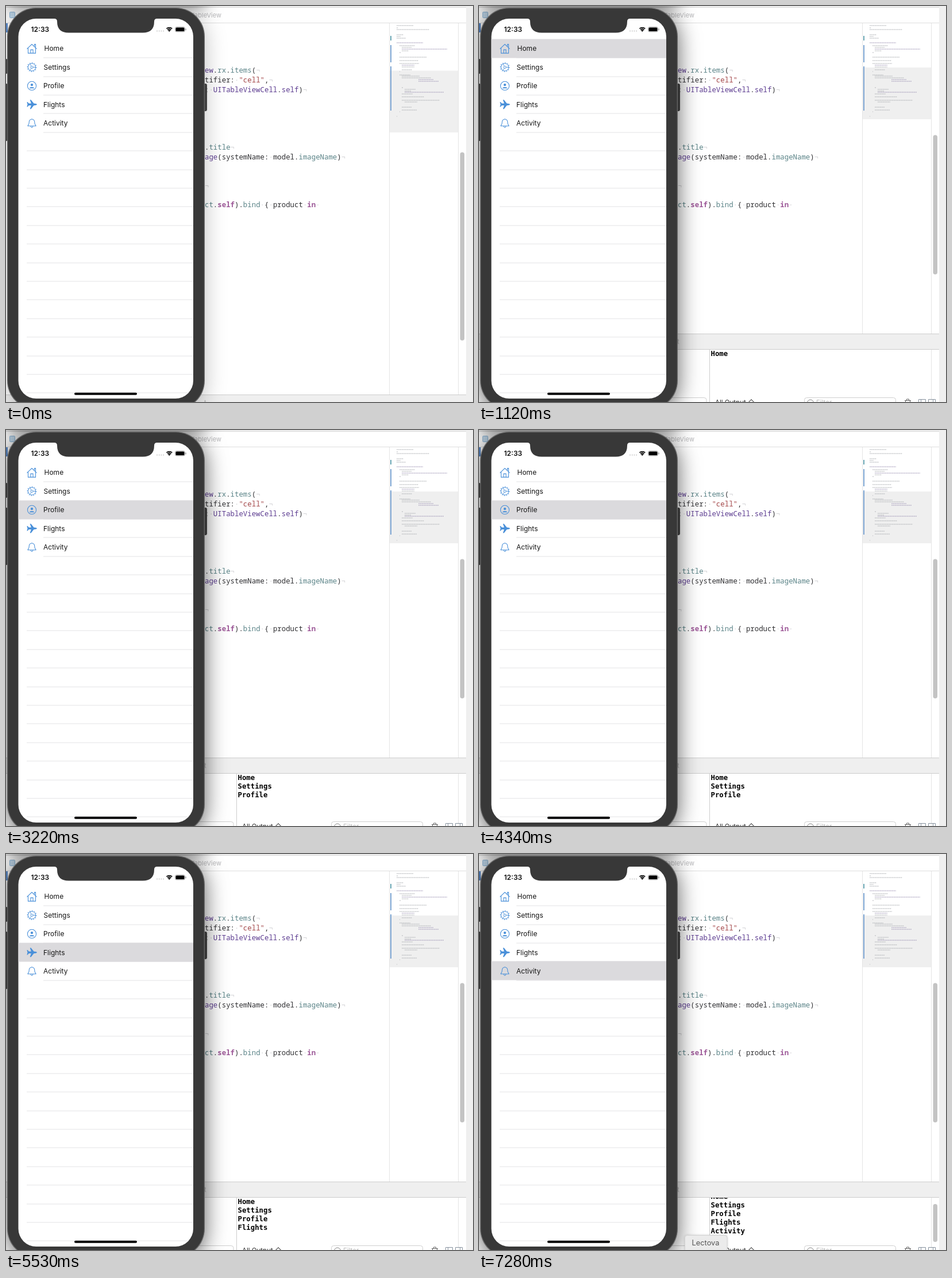
An HTML page with a canvas for the animation above (7350 ms loop, 813 by 689 pixels).

```html
<!DOCTYPE html>
<html lang="en">
<head>
<meta charset="utf-8">
<title>Table view demo</title>
<style>
html, body { margin: 0; width: 100%; height: 100%; overflow: hidden; background: #fff; }
canvas { display: block; }
</style>
</head>
<body>
<canvas id="stage" width="813" height="689"></canvas>
<script>
const c = document.getElementById('stage').getContext('2d');
const LOOP = 7350, ROW = 32.4, LIST_TOP = 57.8;
const SANS = 'Inter, sans-serif', MONO = '"Noto Sans Mono", monospace';
const BLUE = '#4a90d9', DARK = '#303033', TEAL = '#5a8387', PURPLE = '#5d3d91', PINK = '#9c5797', RED = '#a4484a', FAINT = '#d0d0d3';

// label, label x, time pressed, time printed
const items = [
  ['Home', 66.5, 770, 840],
  ['Settings', 65.5, 1890, 1960],
  ['Profile', 65, 3080, 3150],
  ['Flights', 65, 4410, 4480],
  ['Activity', 65, 5600, 5670],
];
const PANEL_OPEN = 840, PANEL_TIME = 210, TIP_AT = 7000;

// baseline followed by [text, colour] runs
const code = [
  [116, ['ew', PURPLE], ['.', DARK], ['rx', TEAL], ['.', DARK], ['items', TEAL], ['(', DARK], ['¬', FAINT]],
  [132.7, ['tifier:', DARK], ['·', FAINT], ['"cell"', RED], [',', DARK], ['¬', FAINT]],
  [149.5, [':', DARK], ['·', FAINT], ['UITableViewCell', PURPLE], ['.', DARK], ['self', PURPLE], [')', DARK], ['¬', FAINT]],
  [249.7, ['.', DARK], ['title', TEAL], ['¬', FAINT]],
  [266.5, ['age', PURPLE], ['(systemName:', DARK], ['·', FAINT], ['model.', DARK], ['imageName', TEAL], [')', DARK], ['¬', FAINT]],
  [316.5, ['¬', FAINT]],
  [350, ['ct', TEAL], ['.', DARK], ['self', PINK, 1], [').', DARK], ['bind', TEAL], ['·', FAINT], ['{', DARK], ['·', FAINT], ['product', DARK], ['·', FAINT], ['in', PINK, 1], ['·', FAINT]],
];

// minimap lines: y, indent, length
const miniLines = ('34 0 29,38 0 2,41 0 57,50 0 12,53 0 7,56 0 16,64 0 46,69 5 27,72 9 17,75 9 79,78 9 12,' +
  '81 5 2,89 5 47,95 5 33,100 5 34,103 9 22,106 9 22,111 9 18,114 5 1,120 5 19,122 9 31,125 9 51,' +
  '128 38 26,131 38 35,142 9 2,145 14 19,148 14 11,150 14 68,153 9 19,158 9 39,164 9 66,167 14 22,' +
  '176 9 17,181 9 26,184 5 1,192 0 1').split(',').map(s => s.split(' ').map(Number));
const miniPurple = new Set([64, 75, 103, 128, 131, 150]);

const ramp = (t, start, length) => Math.min(1, Math.max(0, (t - start) / length));

function rect(x, y, w, h, color) {
  c.fillStyle = color;
  c.fillRect(x, y, w, h);
}
function round(x, y, w, h, r, fill, stroke) {
  c.beginPath();
  c.roundRect(x, y, w, h, r);
  if (fill) { c.fillStyle = fill; c.fill(); }
  if (stroke) { c.strokeStyle = stroke; c.lineWidth = 1; c.stroke(); }
}
function shadow(alpha, blur, dy = 0) {
  c.shadowColor = `rgba(0,0,0,${alpha})`;
  c.shadowBlur = blur;
  c.shadowOffsetY = dy;
}
function text(s, x, y, font, color, align = 'left') {
  c.font = font;
  c.fillStyle = color;
  c.textAlign = align;
  c.fillText(s, x, y);
}
function line(d, color, width = 1.1) {
  c.strokeStyle = color;
  c.lineWidth = width;
  c.stroke(new Path2D(d));
}
function circle(x, y, r, color, width) {
  c.beginPath();
  c.arc(x, y, r, 0, 7);
  if (width) { c.strokeStyle = color; c.lineWidth = width; c.stroke(); }
  else { c.fillStyle = color; c.fill(); }
}

function drawEditor(open) {
  rect(0, 0, 813, 689, '#efefef');
  rect(0, 2, 801, 687, '#fff');
  rect(0, 2, 801, 1, '#dadada');
  rect(0, 29, 801, 1, '#dedede');
  round(6.5, 10.5, 9, 10, 1, '#c5ddf0', '#8fb8da');
  rect(0, 30, 3, 16, '#5b8ac9');
  text('TableView', 375, 20, '11px ' + SANS, '#b8b8ba', 'right');

  for (const [y, ...runs] of code) {
    let x = 346;
    for (const [s, color, bold] of runs) {
      text(s, x, y, (bold ? 700 : 500) + ' 12.38px ' + MONO, color);
      x += s.length * 7.43;
    }
  }

  const viewTop = 112.5 - 5.5 * open;
  rect(668, viewTop, 119, 107.5 - 17.5 * open, '#efefef');
  c.setLineDash([2.4, .6]);
  for (const [y, indent, length] of miniLines) {
    const x = 680 + indent;
    line(`M${x} ${y}h${length}`, miniPurple.has(y) ? '#a9a2be' : '#b6b8bb', 1.2);
  }
  c.setLineDash([]);
  rect(669, 52, 2, 8, '#6aa7b5');
  rect(669, 68, 2, 30, '#7ea6d3');
  rect(669, 105, 2, 77, '#7ea6d3');
  rect(667, 30, 1, 659, '#e4e4e4');
  rect(787, 30, 1, 659, '#e4e4e4');
  round(790.5, 254.5 - 30 * open, 7.5, 327.5 - 85 * open, 3.75, '#c3c3c3');
}

function drawConsole(t, open) {
  const top = 677 - 106 * open;
  rect(0, top, 801, 118, '#fff');
  rect(0, top, 801, 26, '#efefef');
  rect(0, top - 1, 801, 1, '#cdcdcd');
  rect(0, top + 26, 801, 1, '#cdcdcd');
  text('t', 345, top + 17, '11px ' + SANS, '#b5b5b5');
  rect(401, top + 27, 1, 91, '#cdcdcd');
  rect(787, top + 27, 1, 91, '#e4e4e4');

  const scrolled = t >= items[4][3];
  c.save();
  c.beginPath();
  c.rect(402, top + 27, 385, 84);
  c.clip();
  items.forEach(([name, , , printed], i) => {
    const y = top + 38.2 + i * 14.9 - (scrolled ? 9.3 : 0);
    if (t >= printed) text(name, 403.5, y, 'bold 12.34px "DejaVu Sans Mono", monospace', '#000');
  });
  c.restore();
  if (scrolled) round(790.5, top + 38, 7.5, 66, 3.75, '#c3c3c3');

  text('All Output ◇', 411, top + 123, '11.5px ' + SANS, '#333');
  round(250.5, top + 110.5, 145.5, 22, 4, '#fff', '#cfcfcf');
  round(566.5, top + 110.5, 159, 22, 4, '#fff', '#cfcfcf');
  circle(577, top + 119.5, 5.5, '#858585', 1);
  text('Filter', 587, top + 123, '11.5px ' + SANS, '#bdbdbd');
  c.save();
  c.translate(0, top);
  line('M741 115.5h11M744.5 115v-2h4v2M742.5 116v10h8v-10M745 118v6M748 118v6', '#666', 1);
  line('M765.5 113.5h12v10h-12zM769.5 114v9M782.5 113.5h12v10h-12zM790.5 114v9', '#87929e', 1);
  c.restore();
}

const icons = [
  () => {
    line('M-8.5 .5L0-7.5L8.5 .5M-6.5-1V8H6.5V-1M4.5-4V-7.5H6.5V-2M-2 8V2H2V8', BLUE);
  },
  () => {
    circle(0, 0, 6.6, BLUE, 1);
    c.setLineDash([1.4, 2.6]);
    circle(0, 0, 7.7, BLUE, 1.3);
    c.setLineDash([]);
    circle(0, 0, 2, BLUE, .9);
    line('M2 0H6.5M-1-1.8L-3.2-5.6M-1 1.8L-3.2 5.6', BLUE, .9);
  },
  () => {
    circle(0, 0, 7.6, BLUE, 1.1);
    circle(0, -1.8, 2.2, BLUE);
    c.fill(new Path2D('M-4.2 4.4C-3.8 1.2 3.8 1.2 4.2 4.4Z'));
  },
  () => {
    c.fillStyle = BLUE;
    c.fill(new Path2D('M9 0Q8-1.7 3.5-1.7L-1.5-8H-3.3L-1.2-1.7H-5.3L-7.4-4.3H-8.6L-7.5 0L-8.6 4.3H-7.4L-5.3 1.7H-1.2L-3.3 8H-1.5L3.5 1.7Q8 1.7 9 0Z'));
  },
  () => {
    line('M-7 5C-7 3-4.7 3.5-4.7-2C-4.7-5-2.5-6.5 0-7C2.5-6.5 4.7-5 4.7-2C4.7 3.5 7 3 7 5ZM-1.8 5.5C-1.5 8.5 1.5 8.5 1.8 5.5', BLUE);
  },
];

function drawPhone(t) {
  round(-20, 92, 23, 26, 3, '#484848');
  round(-20, 135, 23, 100, 3, '#484848');
  round(330, 135, 20, 48, 3, '#484848');

  // the window title bar lies above the stage and only its shadow shows
  c.save();
  shadow(.5, 30, 4);
  rect(2, -60, 344, 58, '#686868');
  shadow(.25 + .37 * ramp(t, 70, 420), 38, 7);
  round(2, 3, 344, 699, 50, '#686868');
  c.restore();
  round(3.3, 4.3, 341.4, 696.4, 49, '#383838');

  c.save();
  round(21.5, 22, 304.5, 661, 31, '#fff');
  c.clip();

  for (let i = 1; i < 20; i++) {
    const x = i > 5 ? 36 : 65;
    rect(x, Math.round(LIST_TOP + i * ROW) - .5, 326 - x, 1, '#e4e4e6');
  }
  const selected = items.filter(item => t >= item[2]).length - 1;
  if (selected >= 0) {
    rect(21, Math.round(LIST_TOP + selected * ROW) - .5, 306, 33, '#dbdadd');
  }
  items.forEach(([name, x], i) => {
    const y = LIST_TOP + (i + .5) * ROW;
    c.save();
    c.translate(45, y + .1);
    icons[i]();
    c.restore();
    text(name, x, y + 4.4, '12px ' + SANS, '#161616');
  });

  c.fillStyle = '#383838';
  c.fill(new Path2D('M84 21H263V22Q258 22 258 27Q258 46.5 238 46.5H109Q89 46.5 89 27Q89 22 84 22Z'));
  text('12:33', 43.5, 45, '600 12px ' + SANS, '#111');
  for (let i = 0; i < 4; i++) circle(263 + i * 3.7, 43.6, 1, '#c9c9c9');
  for (const r of [2, 4.7, 7.4]) {
    c.beginPath();
    c.arc(284.3, 45, r, -2.3, -.84);
    c.strokeStyle = '#000';
    c.lineWidth = r < 3 ? 2.5 : 1.7;
    c.stroke();
  }
  round(294.5, 36.5, 17, 8.5, 2.4, '#fff', '#aaa');
  round(295.5, 37.5, 15, 6.5, 1.5, '#000');
  rect(312.5, 39.3, 1.2, 3, '#999');
  round(119, 672.7, 109, 4, 2, '#000');
  c.restore();
}

function drawTip() {
  c.save();
  shadow(.2, 4);
  round(358.5, 663.5, 73.5, 32, 4, '#ebebeb');
  c.restore();
  round(358.5, 663.5, 73.5, 32, 4, null, '#d2d2d2');
  text('Lectova', 394.5, 680.7, '12.8px ' + SANS, '#555', 'center');
}

function draw() {
  const t = performance.now() % LOOP;
  const p = ramp(t, PANEL_OPEN, PANEL_TIME);
  const open = p * p * (3 - 2 * p);
  drawEditor(open);
  drawConsole(t, open);
  drawPhone(t);
  if (t >= TIP_AT) drawTip();
  requestAnimationFrame(draw);
}
draw();
</script>
</body>
</html>
```
